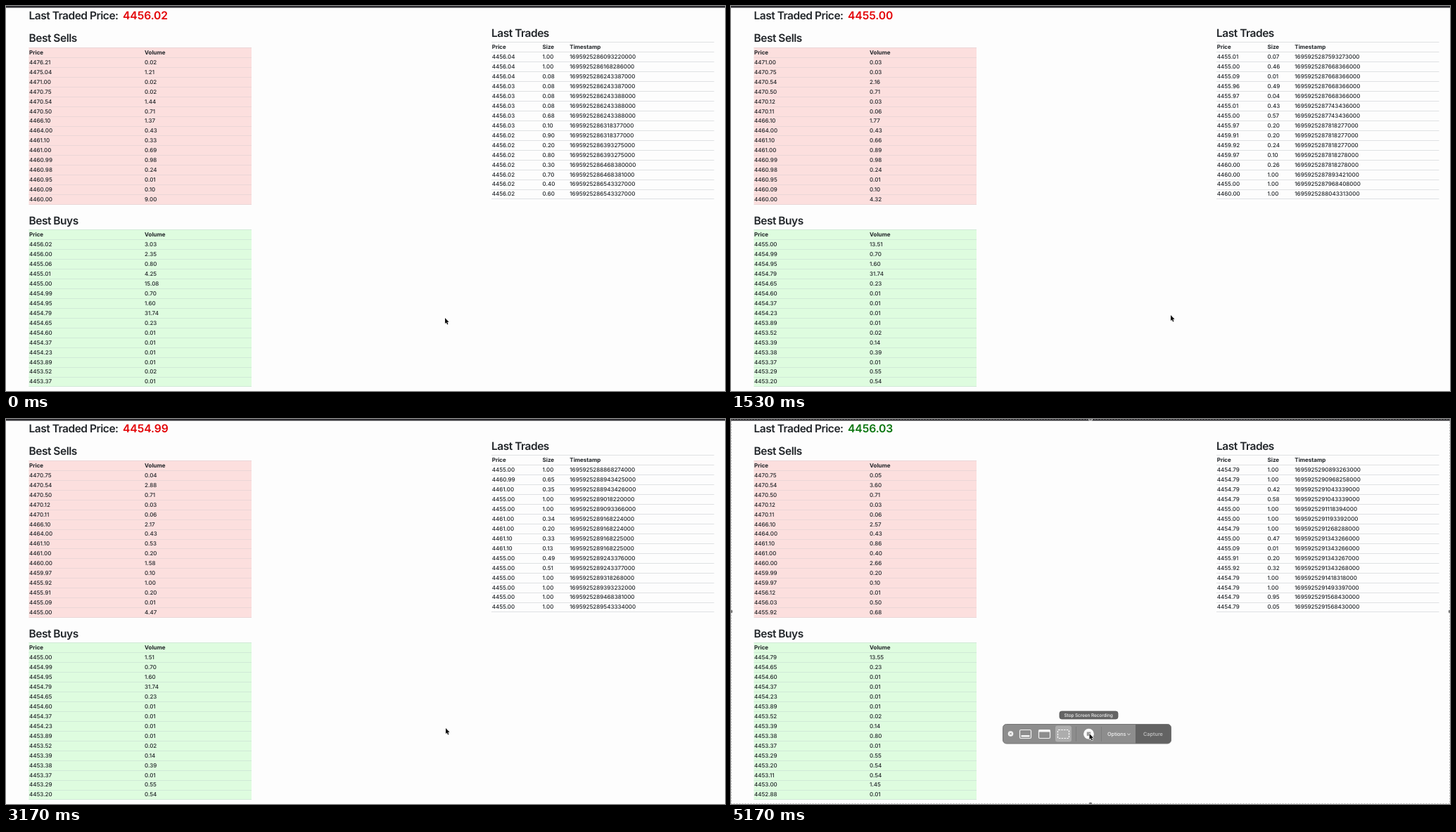
Write an HTML page with a canvas that moves like this. It is 1022 px wide and 548 px high and loops after 5.21 s.

```html
<!DOCTYPE html>
<html lang="en">
<head>
<meta charset="utf-8">
<title>Order book</title>
<style>
  html, body { margin: 0; width: 100%; height: 100%; overflow: hidden; background: #fdfdfd; }
  canvas { display: block; }
</style>
</head>
<body>
<canvas id="stage" width="1022" height="548"></canvas>
<script>
const LOOP = 5210, TICKS = 76, ROWS = 15, PITCH = 13.94, WIDTH = 316.5;
const ctx = document.getElementById('stage').getContext('2d');

// --- Market: a small matching engine. Prices are offsets from 4400. ---

let seed = 7;
const random = () => (seed = seed * 16807 % 2147483647) / 2147483647;
const money = offset => (4400 + offset).toFixed(2);

// An order is [price, volume, slice]; it rests in the queue as equal slices.
function post(side, orders) {
  for (const [price, volume, slice = volume] of orders) {
    for (let left = volume; left > .005; left -= slice) {
      side.push({ price, size: Math.min(slice, left) });
    }
  }
  const sign = side === asks ? 1 : -1;
  side.sort((a, b) => sign * (a.price - b.price));
}

const bids = [], asks = [];
post(bids, [
  [56.04, 2.08], [56.03, .24, .08], [56.03, .78], [56.02, 6.93, 1.1], [56, 1.6, .4], [56, .75, .25],
  [55.06, .8], [55.01, 4.25, .75], [55, 15.08, 5.03], [54.99, .7], [54.95, 1.6, .8], [54.79, 31.74, 4.535],
  [54.65, .23], [54.6, .01], [54.37, .01], [54.23, .01], [53.89, .01], [53.52, .02], [53.37, .01],
  [53, 1.45], [52.88, .01], [52.84, 3.5]
]);
post(asks, [
  [60, 9], [60.09, .1], [60.95, .01], [60.98, .24], [60.99, .98], [61, .69], [61.1, .33], [64, .43],
  [66.1, 1.37], [70.5, .71], [70.54, 1.44], [70.75, .02], [71, .02], [75.04, 1.21], [76.21, .02]
]);

// Sellers come back in waves: a regular refill plus a few new offers near the spread.
const refill = [[71, .01], [70.75, .01], [70.54, .72], [66.1, .4], [61.1, .33], [61, .2]];
const arrivals = {
  18: () => post(asks, [...refill, [70.12, .03], [70.11, .06], [60, 1.58], [59.97, .1], [59.92, .24],
    [59.91, .2], [55.97, .24], [55.96, .49], [55.09, .01], [55, .46]]),
  20: () => post(bids, [[53.39, .14], [53.38, .39], [53.29, .55], [53.2, .54], [53.11, .54]]),
  42: () => {
    post(asks, [...refill, [60, 1.58], [59.97, .1], [55.92, 1], [55.91, .2], [55.09, .01], [55, 4.47]]);
    post(bids, [[55, 1]]);
  },
  62: () => {
    post(asks, [...refill, [60, 1.08], [59.99, .2], [56.12, .01], [56.03, .5]]);
    post(bids, [[53.38, .41]]);
  }
};
const buyTicks = new Set([8, 10, 14, 16, 21, 23, 24, 26, 29, 30, 31, 33, 35, 38, 41, 54, 58, 67, 68, 70, 75]);

function topLevels(side) {
  const levels = new Map();
  for (const { price, size } of side) levels.set(price, (levels.get(price) || 0) + size);
  return [...levels].slice(0, ROWS).map(([price, volume]) => [money(price), volume.toFixed(2)]);
}

// Every 75 ms one lot of 1.00 hits the best price on the other side.
const trades = [], history = [];
for (let tick = 0; tick < TICKS; tick++) {
  if (arrivals[tick]) arrivals[tick]();
  const side = buyTicks.has(tick) ? asks : bids;
  let micros = (286093 + 75 * tick) * 1000 + 220 + Math.floor(random() * 230);
  for (let left = 1; left > .004;) {
    const order = side[0], size = Math.min(left, order.size);
    const last = trades[trades.length - 1] || { price: 0, up: false };
    const up = order.price === last.price ? last.up : order.price > last.price;
    trades.push({ tick, price: order.price, size, up, stamp: `1695925${micros}000` });
    left -= size;
    order.size -= size;
    if (order.size < .004) side.shift();
    if (random() < .35) micros++;
  }
  history.push({ bids: topLevels(bids), asks: topLevels(asks).reverse() });
}

const tradesUpTo = tick => trades.filter(t => t.tick <= tick);
// Panels refresh twice a second, each a little ahead of the half second.
const refreshTick = (t, lead) => Math.floor(6.3 + 6.7 * Math.floor((t + lead) / 500));

// --- Drawing ---

function text(str, x, y, size, weight, color = '#212529', spacing = 0) {
  ctx.font = `${weight} ${size}px Inter, "Liberation Sans", sans-serif`;
  ctx.letterSpacing = spacing + 'px';
  ctx.fillStyle = color;
  ctx.fillText(str, x, y);
}

const heading = (str, x, y) => text(str, x, y, 15.5, 600, '#212529', -.48);

function rect(x, y, w, h, color) {
  ctx.fillStyle = color;
  ctx.fillRect(x, y, w, h);
}

function rounded(x, y, w, h, r, fill, stroke) {
  ctx.beginPath();
  ctx.roundRect(x, y, w, h, r);
  if (fill) { ctx.fillStyle = fill; ctx.fill(); }
  if (stroke) { ctx.strokeStyle = stroke; ctx.stroke(); }
}

function disc(x, y, r, color) {
  ctx.beginPath();
  ctx.arc(x, y, r, 0, 7);
  ctx.fillStyle = color;
  ctx.fill();
}

function polyline(points, color, width = 1) {
  ctx.beginPath();
  points.forEach(([x, y]) => ctx.lineTo(x, y));
  ctx.strokeStyle = color;
  ctx.lineWidth = width;
  ctx.stroke();
}

function table(x, y, columns, head, rows, background, line) {
  rect(x, y, WIDTH, PITCH * (ROWS + 1), background);
  rect(x, Math.round(y), WIDTH, 1, line);
  [head, ...rows].forEach((cells, i) => {
    const top = y + i * PITCH;
    cells.forEach((cell, c) => text(cell, columns[c], top + 9.9, 8, i ? 500 : 700));
    rect(x, Math.round(top + PITCH), WIDTH, 1, line);
  });
}

function selectionFrame() {
  ctx.lineWidth = 1;
  ctx.setLineDash([2, 2]);
  ctx.strokeStyle = 'rgba(160, 160, 160, .7)';
  ctx.strokeRect(.5, .5, 1021, 547);
  ctx.setLineDash([]);
  for (const [x, y] of [[511, 0], [0, 274], [1022, 274], [511, 548]]) {
    disc(x, y, 3, '#e6e6e6');
    disc(x, y, 2.2, '#777');
  }
}

function toolbar(hoverStop) {
  const icon = '#f4f4f4';
  ctx.lineWidth = 1;
  rounded(386.5, 434.5, 239, 27.5, 5, '#8d8d8d');
  rounded(575, 434.5, 50.5, 27.5, [0, 5, 5, 0], '#636363');
  rounded(386.5, 434.5, 239, 27.5, 5, null, '#757575');
  disc(397.5, 448, 3.8, icon);
  polyline([[396.1, 446.6], [398.9, 449.4]], '#777', .8);
  polyline([[398.9, 446.6], [396.1, 449.4]], '#777', .8);
  ctx.lineWidth = 1.2;
  rounded(410.5, 442.5, 16, 12, 1.5, null, icon);
  rect(412.5, 450, 12, 2.6, icon);
  rounded(437.5, 442.5, 16, 12, 1.5, null, icon);
  rect(437.5, 442.5, 16, 3, icon);
  rounded(461, 436.5, 23, 23, 3, '#adadad');
  ctx.setLineDash([2.4, 1.4]);
  rounded(464.5, 442.5, 16, 12, 1, null, '#fff');
  ctx.setLineDash([]);
  rect(490, 438, 1, 21, '#7d7d7d');
  rect(526, 438, 1, 21, '#7d7d7d');
  disc(508.5, 448.2, 7.4, '#fafafa');
  rect(505.8, 445.5, 5.4, 5.4, hoverStop ? '#999' : '#777');
  text('Options', 535, 451, 7.3, 500, '#f0f0f0', -.1);
  polyline([[563.5, 447.8], [565.5, 449.6], [567.5, 447.8]], '#f0f0f0');
  text('Capture', 586, 451, 7.3, 500, '#c9c9c9');
}

function tooltip() {
  ctx.lineWidth = .8;
  rounded(467, 416, 83, 11, 3, '#646464', '#555');
  text('Stop Screen Recording', 473.5, 423.9, 6.5, 500, '#f0f0f0', -.1);
}

const cursorPath = [[0, 624, 444], [300, 625, 440], [4250, 625, 440], [4530, 592, 446], [4850, 509.5, 448], [LOOP, 509.5, 448]];

function cursor(t) {
  const i = cursorPath.findIndex(p => p[0] > t);
  const [t0, x0, y0] = cursorPath[i - 1], [t1, x1, y1] = cursorPath[i];
  const u = (t - t0) / (t1 - t0), ease = u * u * (3 - 2 * u);
  ctx.save();
  ctx.translate(x0 + (x1 - x0) * ease, y0 + (y1 - y0) * ease);
  ctx.beginPath();
  for (const [x, y] of [[0, 0], [0, 8], [1.8, 6.4], [3.1, 9.4], [4.5, 8.8], [3.2, 5.9], [5.6, 5.7]]) ctx.lineTo(x, y);
  ctx.closePath();
  ctx.lineJoin = 'round';
  ctx.lineWidth = 1.3;
  ctx.strokeStyle = '#fff';
  ctx.stroke();
  ctx.fillStyle = '#111';
  ctx.fill();
  ctx.restore();
}

function draw(t) {
  const book = history[refreshTick(t, 80)];
  const tape = tradesUpTo(refreshTick(t, 200)).slice(-ROWS);
  const last = tradesUpTo(19 + Math.floor((t - 913) / 75.4)).pop();

  ctx.textRendering = 'geometricPrecision';
  rect(0, 0, 1022, 548, '#fdfdfd');
  rect(0, 0, 1022, 2.5, '#2d2c30');

  heading('Last Traded Price:', 32.5, 18.8);
  text(money(last.price), 166, 18.8, 15.7, 600, last.up ? '#0b760f' : '#e30407', -.1);

  heading('Best Sells', 32.5, 50.7);
  table(32.5, 59, [33, 197], ['Price', 'Volume'], book.asks, '#fcdfde', '#ebd6d7');
  heading('Best Buys', 32.5, 310.5);
  table(32.5, 318.4, [33, 197], ['Price', 'Volume'], book.bids, '#defcdf', '#d0e9d7');
  heading('Last Trades', 690, 43.5);
  table(690, 51.4, [690.7, 762.5, 801.3], ['Price', 'Size', 'Timestamp'],
    tape.map(f => [money(f.price), f.size.toFixed(2), f.stamp]), '#fdfdfd', '#dfe1e3');

  if (t >= 4230) {
    selectionFrame();
    toolbar(t > 4800);
  }
  if (t >= 4980) tooltip();
  cursor(t);
}

function loop() {
  draw(performance.now() % LOOP);
  requestAnimationFrame(loop);
}
loop();
</script>
</body>
</html>
```
